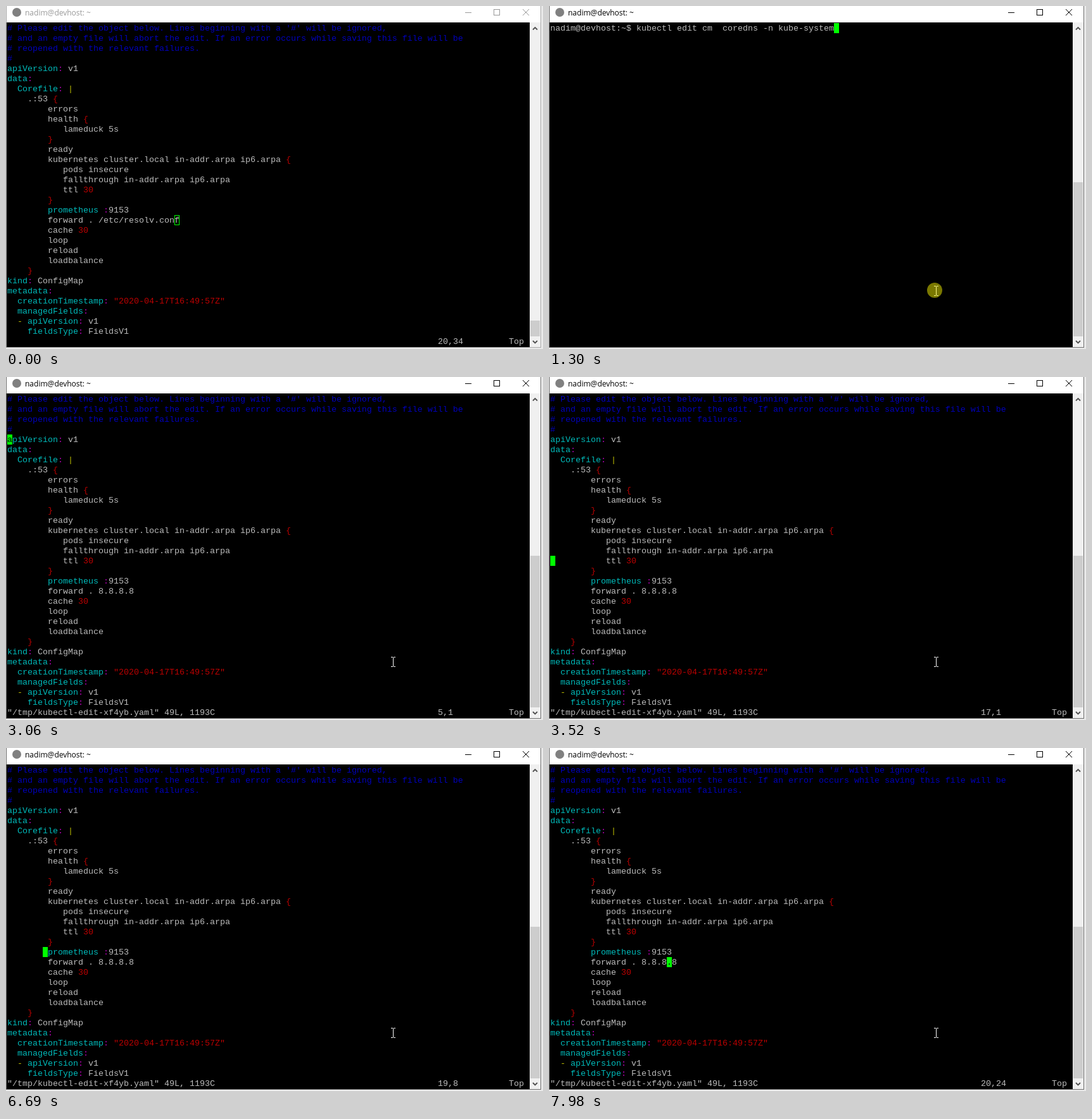
Recreate the animation shown at these times as an HTML page with a canvas. Size 848 px wide and 543 px high, loop 8 s.

```html
<!DOCTYPE html>
<html lang="en">
<head>
<meta charset="utf-8">
<title>Terminal</title>
<style>
  html, body { margin: 0; width: 100%; height: 100%; overflow: hidden; background: #e9e9e9; }
  canvas { display: block; }
</style>
</head>
<body>
<canvas id="stage" width="848" height="543"></canvas>
<script>
const ctx = document.getElementById('stage').getContext('2d', { alpha: false });
const LOOP = 8000;
const CELL_W = 8, CELL_H = 16, LEFT = 2, TOP = 27;
const GREY = '#bbbbbb', BLUE = '#0000bb', TEAL = '#00bbbb', MAGENTA = '#bb00bb',
      RED = '#bb0000', BROWN = '#bbbb00', GREEN = '#00ff00';

const HOST = 'nadim@devhost';
const COMMAND = HOST + ':~$ kubectl edit cm  coredns -n kube-system';
const FILE_INFO = '"/tmp/kubectl-edit-xf4yb.yaml" 49L, 1193C';

const configFile = forward => `# Please edit the object below. Lines beginning with a '#' will be ignored,
# and an empty file will abort the edit. If an error occurs while saving this file will be
# reopened with the relevant failures.
#
apiVersion: v1
data:
  Corefile: |
    .:53 {
        errors
        health {
           lameduck 5s
        }
        ready
        kubernetes cluster.local in-addr.arpa ip6.arpa {
           pods insecure
           fallthrough in-addr.arpa ip6.arpa
           ttl 30
        }
        prometheus :9153
        forward . ${forward}
        cache 30
        loop
        reload
        loadbalance
    }
kind: ConfigMap
metadata:
  creationTimestamp: "2020-04-17T16:49:57Z"
  managedFields:
  - apiVersion: v1
    fieldsType: FieldsV1`.split('\n');

const oldConfig = configFile('/etc/resolv.conf');
const newConfig = configFile('8.8.8.8');

// Editor cursor: [time, row, column]
const moves = [[2020, 1, 1], [2520, 2, 1]];
for (let i = 0; i < 8; i++) moves.push([2980 + Math.floor(i * 54 / 7) * 10, 3 + 2 * i, 1]);
moves[moves.length - 1][0] = 3520;
moves.push(
  [4400, 18, 1], [4680, 19, 1], [4900, 20, 1], [5050, 21, 1],
  [5520, 20, 1], [5750, 19, 1], [6080, 19, 2],
  [6540, 19, 3], [6620, 19, 6], [6690, 19, 8], [6770, 19, 11], [6860, 20, 11],
  [7110, 20, 12], [7670, 20, 13], [7750, 20, 16], [7830, 20, 19], [7900, 20, 21], [7980, 20, 24]
);

// Mouse pointer: [time, x, y]
const pointerPath = [[620, 687, 513], [920, 654, 483], [1000, 622, 457], [1070, 611, 451]];

const latest = (steps, t) => steps.filter(s => s[0] <= t).pop();

function rect(color, x, y, w, h) {
  ctx.fillStyle = color;
  ctx.fillRect(x, y, w, h);
}

function polyline(color, width, points) {
  ctx.strokeStyle = color;
  ctx.lineWidth = width;
  ctx.beginPath();
  points.forEach(([x, y]) => ctx.lineTo(x, y));
  ctx.stroke();
}

function disc(color, x, y, r) {
  ctx.fillStyle = color;
  ctx.beginPath();
  ctx.arc(x, y, r, 0, 2 * Math.PI);
  ctx.fill();
}

const cellX = col => LEFT + (col - 1) * CELL_W;
const cellY = row => TOP + (row - 1) * CELL_H;

function print(text, row, col, color = GREY) {
  ctx.font = `${CELL_W / 0.6}px "Liberation Mono", monospace`;
  ctx.fillStyle = color;
  ctx.fillText(text, cellX(col), cellY(row) + 12);
}

const TOKEN = /("[^"]*"|[{}]|\b30\b)|([A-Za-z]+(?= ?:))|((?<=[A-Za-z ]):)|(\||-(?= ))/g;

function printYaml(line, row) {
  if (line[0] === '#') return print(line, row, 1, BLUE);
  let end = 0;
  for (const m of line.matchAll(TOKEN)) {
    print(line.slice(end, m.index), row, end + 1);
    print(m[0], row, m.index + 1, m[1] ? RED : m[2] ? TEAL : m[3] ? MAGENTA : BROWN);
    end = m.index + m[0].length;
  }
  print(line.slice(end), row, end + 1);
}

function drawCursor(row, col, focused, char = ' ') {
  const x = cellX(col), y = cellY(row);
  if (focused) {
    rect(GREEN, x, y, CELL_W, CELL_H);
    print(char, row, col, '#000');
  } else {
    ctx.strokeStyle = GREEN;
    ctx.lineWidth = 1;
    ctx.strokeRect(x + 0.5, y + 0.5, CELL_W - 1, CELL_H - 1);
  }
}

function drawEditor(lines, row, col, focused, info) {
  lines.forEach((line, i) => printYaml(line, i + 1));
  print(info, 32, 1);
  print(`${row},${col}`, 32, 86);
  print('Top', 32, 100);
  drawCursor(row, col, focused, lines[row - 1][col - 1]);
}

function drawShell(focused, entered) {
  print(COMMAND, 1, 1);
  if (entered) drawCursor(2, 1, focused);
  else drawCursor(1, COMMAND.length + 1, focused);
}

function drawWindow(focused, thumbTop) {
  const ink = focused ? '#000' : '#999';
  const edge = focused ? '#6e6e6e' : '#a8a8a8';
  rect('#e9e9e9', 0, 0, 848, 543);
  rect(edge, 0, 0, 845, 541);
  rect('#fff', 1, 0, 843, 26);
  rect('#000', 1, 26, 826, 514);

  disc('#808080', 17, 10, 7);
  ctx.font = '12px "Open Sans", sans-serif';
  ctx.fillStyle = ink;
  ctx.fillText(HOST + ': ~', 30, 15);

  rect(ink, 725, 10, 10, 1);
  ctx.strokeStyle = ink;
  ctx.lineWidth = 1;
  ctx.strokeRect(770.5, 5.5, 9, 9);
  polyline(ink, 1, [[816, 5], [826, 15]]);
  polyline(ink, 1, [[826, 5], [816, 15]]);

  rect('#f0f0f0', 827, 26, 17, 514);
  rect('#cdcdcd', 828, thumbTop, 15, 523 - thumbTop);
  polyline('#505050', 1.8, [[832, 37.5], [835.5, 34], [839, 37.5]]);
  polyline('#505050', 1.8, [[832, 530], [835.5, 533.5], [839, 530]]);
}

function drawPointer(x, y) {
  for (const end of [y - 8, y + 7]) {
    rect('#fff', x - 3, end, 3, 1);
    rect('#fff', x + 1, end, 3, 1);
  }
  rect('#fff', x, y - 7, 1, 14);
}

const drawClick = (x, y) => disc('rgba(255, 250, 0, 0.48)', x, y, 12);

function draw(t) {
  const focused = t >= 1300;
  drawWindow(focused, t < 620 ? 498 : t < 2020 ? 279 : 283);

  if (t < 620) {
    drawEditor(oldConfig, 20, 34, false, '');
  } else if (t < 2020) {
    drawShell(focused, t >= 1950);
  } else {
    const [, row, col] = latest(moves, t);
    drawEditor(newConfig, row, col, true, FILE_INFO);
  }

  const pointer = latest(pointerPath, t);
  if (pointer) drawPointer(pointer[1], pointer[2]);
  if (t >= 370 && t < 620) drawClick(747, 552);
  if (t >= 1300 && t < 1470) drawClick(609, 450);
}

const start = performance.now();
function tick() {
  draw((performance.now() - start) % LOOP);
  requestAnimationFrame(tick);
}
tick();
</script>
</body>
</html>
```
